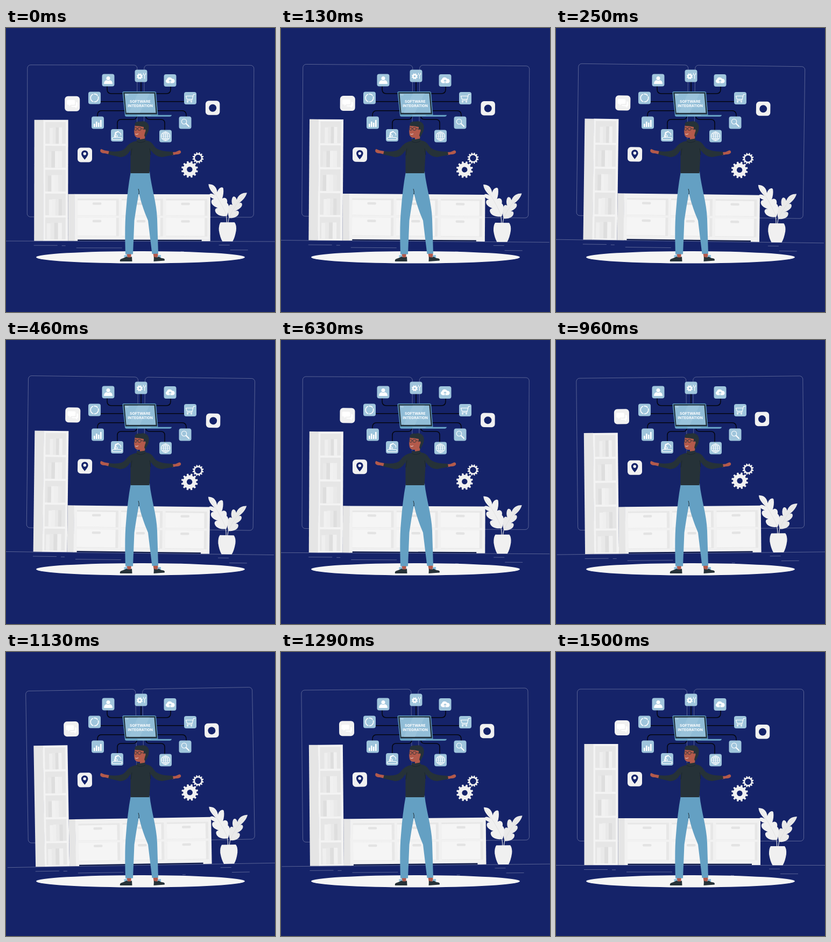
Animation, 500 px wide and 528 px high, one loop 1540 ms. Source, as an HTML page:

```html
<!DOCTYPE html>
<html lang="en">
<head>
<meta charset="utf-8">
<title>Software integration</title>
<style>
html, body { margin: 0; width: 100%; height: 100%; overflow: hidden; background: #152369; }
svg { display: block; width: 100%; height: 100%; }
.line { fill: none; stroke: #fff; stroke-opacity: .36; stroke-width: .8; }
.wire { fill: none; stroke: #04060f; stroke-width: 1.5; }
.ico { fill: none; stroke: #fff; stroke-width: 1.1; stroke-linecap: round; stroke-linejoin: round; }
.solid { fill: #fff; stroke: none; }
text { font: 700 6.8px Inter, "Open Sans", sans-serif; fill: #fff; text-anchor: middle; }
</style>
</head>
<body>
<svg viewBox="0 0 500 528">
  <g id="room">
    <g class="line">
      <rect x="39.5" y="69" width="204" height="282.5" rx="6"/>
      <rect x="256.5" y="69" width="204" height="282.5" rx="6"/>
      <path d="M0 396.5H500M52 404.5H96M104 405H111M131 409H216M325 415.4H331M396 403.3H416M417 412.4H450"/>
    </g>
    <g id="furniture"></g>
    <g id="plant">
      <path d="M410.500 362Q411 352 408 343M413 362Q414 352 418 343" fill="none" stroke="#e6e6e6" stroke-width="1.1"/>
      <path fill="#f0f0f0" d="M376.500 290C384 290 391 293 393 305C394 298 402 293 404 298C405 305 404 311 402 317C407 313 413 317 411 325C415 328 416 336 413 343L411 349C402 351 391 348 389 340C388 335 393 333 398 335C390 334 380 328 382 321C383 317 389 317 393 320C387 318 378 315 378 310C379 306 386 308 389 311C382 304 377 298 376.500 290Z"/>
      <path fill="#e9e9e9" d="M448 306C440 306 432 309 429 319C427 311 421 311 420 318C419 322 420 326 421 329C416 325 413 331 414 338C412 342 413 348 415 353C424 354 432 350 433 344C434 339 429 338 424 341C432 338 440 333 439 327C438 323 434 324 431 327C440 321 446 314 448 306Z"/>
      <path d="M377 291Q397 317 410 347M447 307Q426 326 415 352" fill="none" stroke="#d9d9d9" stroke-width=".6"/>
      <path fill="#f0f0f0" d="M399 361H425Q429 366 428 376Q426 389 421.500 396.500H402.500Q398 389 396 376Q395.500 366 399 361Z"/>
    </g>
    <g id="badges"></g>
    <g fill="#f0f0f0" id="gears"></g>
  </g>

  <path class="wire" d="M188 107V114Q188 122 196 122H220M251 100V121M306 108V114Q306 122 298 122H278M176 136.700H221M278 136.700H332M170 166V162Q170 153.700 178 153.700H222M335 166V162Q335 153.700 327 153.700H280M207 189V177Q207 170 214 170H236Q243 170 243 164M295 190V177Q295 170 288 170H268Q260 170 260 164"/>
  <g id="icons"></g>

  <g id="laptop">
    <path fill="#5e9cc1" d="M216.500 120Q216.500 118 219 118H276Q278.500 118 279 120L282.500 162H221Z"/>
    <path fill="#22303a" d="M218 119.500H277.500L281 160.500H222Z"/>
    <path fill="#91bdd7" d="M220.500 121.800H275.500L278.500 157.800H223.500Z"/>
    <path fill="#a0c8de" d="M245 121.800H267L249 157.800H228Z" opacity=".6"/>
    <path d="M222.500 124.300H227.500" stroke="#fff" stroke-dasharray="1 .9"/>
    <path fill="#6aa6c8" d="M221 161.700H308Q307.500 164.700 304 164.700H224Q221 164.700 221 161.700Z"/>
    <path fill="#8bb9d5" d="M243 161.700H270Q269 163.300 267 163.300H246Z"/>
    <text x="249.300" y="138.700">SOFTWARE</text>
    <text x="249.700" y="147.100">INTEGRATION</text>
  </g>

  <ellipse cx="250" cy="426.300" rx="194" ry="11.300" fill="#f5f5f5"/>

  <g id="person">
    <path fill="#b35a4b" d="M224.500 417H233L232 429H225ZM273 417H282L283 428H275ZM192 229L183 227.500L177 225Q174.500 226 175.500 230Q178 233.500 184 233L192 235ZM308 231L315 230.500L322 227.500Q326 228 325 232Q322 235.500 316 235L309 236.500Z"/>
    <path fill="#8fc1dd" d="M219 423L224.500 421L226 426L220 427ZM283 422L288 422L288 428L281 427Z"/>
    <path fill="#263238" d="M212 434Q211 430 215 429Q221 427 224 425Q229 428 234 425L234.500 434ZM274.500 434L275 425Q280 428 284 425Q287 428 293 428.500Q296 430 294.500 432.500Z"/>
    <path fill="#64a0c3" d="M232 267H267C270 296 280 325 281 355L283 419.500L271.500 420L264 358Q253 333 247 307Q242 333 238.500 358L236 420.500H222C221 389 221 361 223 340Q226 299 232 267Z"/>
    <path d="M246 299Q248 304 247 309" fill="none" stroke="#263238" stroke-width="1"/>
    <path fill="#b35a4b" d="M240 180Q237 190 239 199Q241 205 249 204V210H257.500L261 184Z"/>
    <path fill="#263238" d="M240.500 182C237 177 243 172.500 250 174C258 171 267 177 265.500 186C265.500 193 262 196 259 203L257 200L258.500 194Q261 190 258 188L256 190V184Q248 182 240.500 182Z"/>
    <g fill="none" stroke="#263238" stroke-width=".8">
      <circle cx="248" cy="187.500" r="3"/><ellipse cx="241" cy="187.500" rx="2.200" ry="3"/>
      <path d="M243 187H245M251 187L256 188"/>
      <path d="M240.500 197Q243 199 246 196.500" stroke="#fff"/>
    </g>
    <path fill="#263238" d="M243 206Q250 208 258 205.500L260 209Q270 210 275 219Q282 230 310 230L311 236L290 240Q278 240 269 227L266.500 270H231.500V227Q223 241 212 240L190 235L191.500 229Q215 232 222 223Q231 211 243 210Z"/>
    <path d="M243 211Q251 215 259 210M232 237L234 224M269 236L267 224" fill="none" stroke="#17212a" stroke-width=".7"/>
  </g>
</svg>
<script>
const $ = id => document.getElementById(id);
const rect = (x, y, w, h, fill, r = 0) =>
  `<rect x="${x}" y="${y}" width="${w}" height="${h}" rx="${r}" fill="${fill}"/>`;
const path = (d, cls = "") => `<path class="${cls}" d="${d}"/>`;

function gear(cx, cy, outer, root, hole, teeth) {
  const points = [];
  for (let i = 0; i < teeth; i++) {
    for (const [offset, r] of [[.2, root], [.31, outer], [.69, outer], [.8, root]]) {
      const a = (i + offset) / teeth * 2 * Math.PI;
      points.push(`${cx + r * Math.cos(a)} ${cy + r * Math.sin(a)}`);
    }
  }
  return `<path fill-rule="evenodd" d="M${points.join("L")}ZM${cx - hole} ${cy}a${hole} ${hole} 0 1 0 ${2 * hole} 0a${hole} ${hole} 0 1 0 ${-2 * hole} 0Z"/>`;
}

function bookcase() {
  const left = [81, 78, 78, 80, 76];
  const tones = ["#efefef", "#e9e9e9", "#dedede", "#f1f1f1"];
  let out = rect(52.5, 171, 17.5, 225, "#e5e5e5") + rect(69.5, 171, 46, 225, "#f3f3f3");
  left.forEach((x, row) => {
    const y = 175 + row * 44.4;
    out += rect(73, y, 38, 40.5, "#e6e6e6");
    const w = (104 - x) / 4;
    for (let i = 0; i < 4; i++) {
      const drop = i === 0 ? 11 : 10;
      out += rect(x + i * w, y + drop, w + .1, 40.5 - drop, tones[(i + row) % 4]);
    }
  });
  return out;
}

function cabinet() {
  let out = rect(127, 390, 253, 5, "#152369") + rect(133, 394, 231, 1.5, "#101a3c") +
    rect(115.5, 309, 12.5, 87, "#e5e5e5") + rect(127.5, 309, 252.5, 84.6, "#f1f1f1") +
    rect(127.5, 393, 6, 3, "#f1f1f1") + rect(364, 393, 16, 3, "#f1f1f1");
  for (const x of [133, 215, 297.5]) {
    out += rect(x, 317.5, 77, 70, "#e7e7e7") + rect(x, 349, 77, 4, "#f1f1f1");
    for (const y of [320.5, 353]) {
      out += rect(x, y, 72, y < 350 ? 28 : 33.5, "#f5f5f5") + rect(x + 28, y + 4, 16.5, 4.5, "#e3e3e3", 2);
    }
  }
  return out;
}

$("furniture").innerHTML = bookcase() + cabinet();

$("badges").innerHTML =
  rect(109, 127, 28, 28, "#f1f1f1", 6) +
  path("M115 134h11q2 0 2 2v5q0 2-2 2h-6l-3 3v-3h-2q-2 0-2-2v-5q0-2 2-2ZM130 138q3 0 3 2v5q0 2-2 2v3l-3-3h-5q-2 0-2-2h7q2 0 2-2Z", "solid") +
  rect(370.7, 135, 26.5, 26.5, "#f1f1f1", 6) +
  '<circle cx="384" cy="148.500" r="7" fill="#152369"/>' +
  rect(133, 222.7, 27, 27, "#f1f1f1", 6) +
  '<path fill="#152369" fill-rule="evenodd" d="M146.300 245Q140 238 140 234a6.300 6.300 0 0 1 12.600 0Q152.600 238 146.300 245ZM143.500 234a2.800 2.800 0 1 0 5.600 0a2.800 2.800 0 1 0 -5.600 0Z"/>';

$("gears").innerHTML = gear(341.4, 262.7, 15.6, 12.4, 5.2, 12) + gear(357, 241.2, 10.5, 8.4, 5.8, 12);

// Each entry: card centre, then artwork drawn around 0,0.
const icons = [
  [190, 97, '<circle cy="-3.500" r="3.500" class="solid"/>' + path("M-8 7Q-8 1 -3 0Q0 2 3 0Q8 1 8 7Z", "solid")],
  [251, 89, `<g class="solid">${gear(-2.5, .8, 5.7, 4.4, 1.9, 8)}</g>` + path("M6.5 -1V5M4.500 -5V-3Q6.500 0 8.500 -3V-5")],
  [305, 97.5, path("M-5 5a3.700 3.700 0 0 1 -1 -7a5.500 5.500 0 0 1 10 -1a4 4 0 0 1 1 8Z", "solid") +
    '<path d="M0 5V-1M-2 1L0 -1L2 1" stroke="#9fc5dc"/>'],
  [164.5, 130, '<circle r="7.300" stroke-width="1.600" stroke-dasharray="12 1.500 18 1.500 8 1.500" stroke-linecap="butt"/>'],
  [342.5, 130.5, path("M9 -7H6L3 4H-6M5 -4H-8L-6 2H3.500") + '<circle cx="-5" cy="6.500" r="1"/><circle cx="2" cy="6.500" r="1"/>'],
  [170.5, 176, path("M-7.500 2h2.600v6h-2.600ZM-3.500 -2h2.600v10h-2.600ZM.5 0h2.600v8h-2.600ZM4.500 -5h2.600v13h-2.600Z", "solid")],
  [333, 176, '<circle cx="-2" cy="-2" r="4.700"/><path d="M2 2L7 7" stroke-width="2"/>'],
  [206.5, 199.5, path("M-7 4H7a2 2 0 0 1 0 4H-7a2 2 0 0 1 0 -4M-5 2H1L-3 -4L2 -7L7 -3V0M-3 -4L-5 2") +
    '<path d="M-4 3L-3 -5L2 -7" stroke-width="2"/>'],
  [296.5, 201, '<circle r="8"/><ellipse rx="3.700" ry="8"/>' + path("M0 -8V8M-8 0H8M-7 -4H7M-7 4H7")]
];
$("icons").innerHTML = icons.map(([x, y, art]) =>
  `<g transform="translate(${x} ${y})">${rect(-11.5, -11.5, 23, 23, "#9fc5dc", 4)}<g class="ico">${art}</g></g>`
).join("");

const LOOP = 1540, STEPS = 37;

// The room sways one degree each way at constant speed, in discrete steps.
function draw() {
  const step = Math.floor(performance.now() % LOOP / LOOP * STEPS);
  const phase = (step + 1) / STEPS;
  const angle = 4 * Math.abs((phase + .75) % 1 - .5) - 1;
  $("room").setAttribute("transform", `rotate(${angle} 250 242)`);
  requestAnimationFrame(draw);
}
draw();
</script>
</body>
</html>
```
